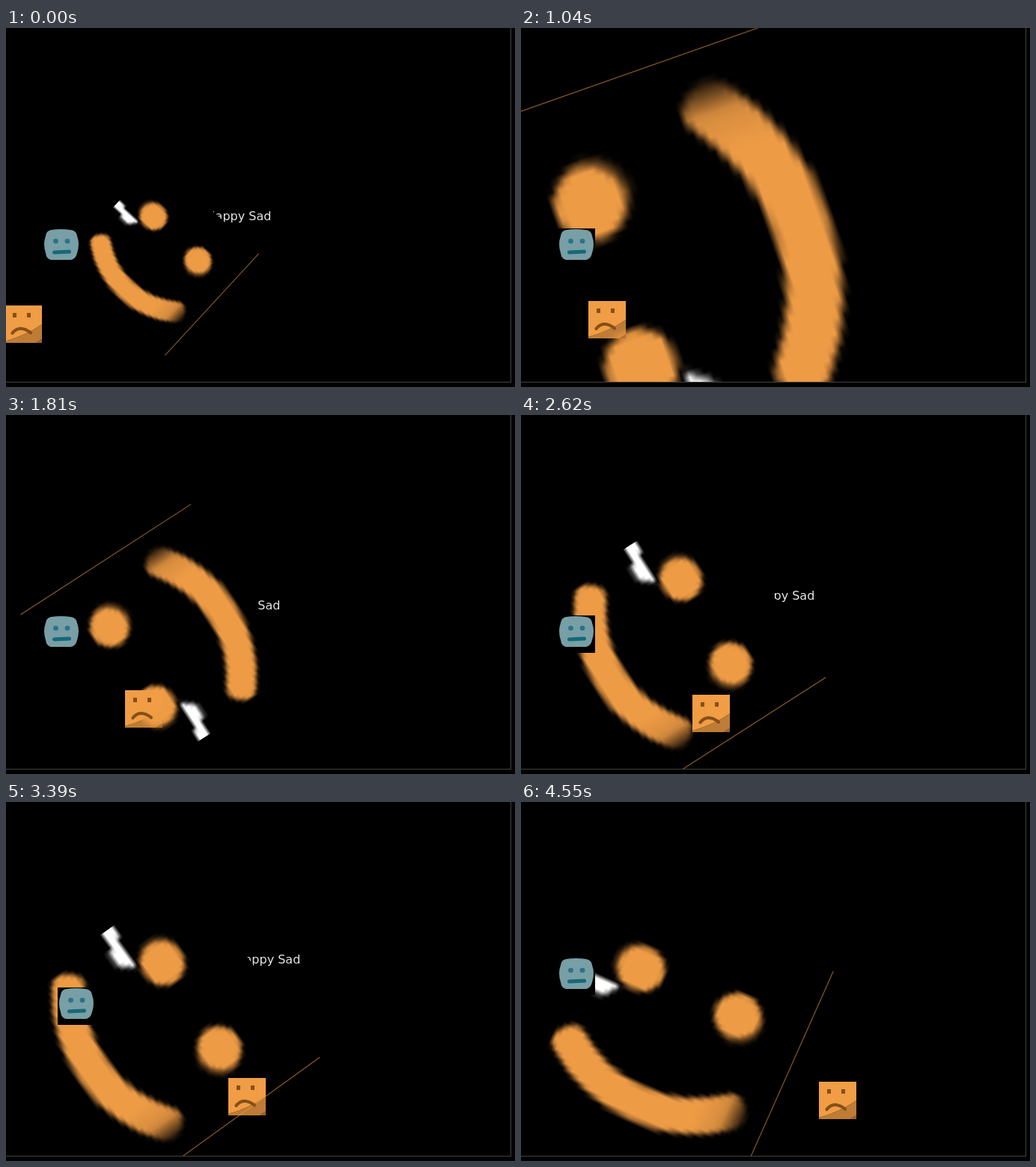
Write an HTML page with a canvas that moves like this. It is 680 px wide and 480 px high and loops after 4590 ms.

```html
<!DOCTYPE html>
<html lang="en">
<head>
<meta charset="utf-8">
<title>Happy Sad</title>
<style>
html, body { margin: 0; width: 100%; height: 100%; overflow: hidden; background: #000; }
canvas { display: block; width: 680px; height: 480px; }
</style>
</head>
<body>
<canvas id="stage" width="680" height="480"></canvas>
<script>
const LOOP = 4590;
const ORANGE = '#ed9b45';
const ctx = document.getElementById('stage').getContext('2d');

// Tracks: [time, x, y]
const pointer = [ // direction turns the happy face, distance scales it
  [0, 2.72, 2.5], [110, 3.08, 3.08], [390, -2.36, -2.36], [640, -1.1, -1.1],
  [1100, -3.7, -10.8], [1340, -4.32, -13.5], [1460, -4.4, -13.8], [1630, -4.5, -11],
  [1810, -2.97, -4.58], [2160, 3.3, 5.1], [2620, 3.13, 4.88], [3000, 3.4, 5.26],
  [3390, 3.55, 4.94], [3620, 6.1, 3], [3830, 4.54, 4.54], [4550, 5.82, 2.59]
];
const label = [
  [0, 267.5, 257], [640, 310.5, 230], [1340, 295, 246], [1810, 279.5, 260],
  [2620, 305.5, 247], [3390, 306.5, 216], [4550, 298, 252]
];
const sad = [
  [0, -2, 371], [640, 55, 365], [1340, 116, 365], [1810, 159, 368],
  [2620, 229, 374], [3390, 297, 369], [4550, 398, 374]
];
const neutral = [
  [0, 49, 268], [3000, 69, 268], [3250, 69, 248],
  [3700, 69, 228], [3950, 49, 228], [4200, 49, 208]
];

function lerpTrack(track, t) {
  const i = track.findIndex(k => k[0] > t);
  if (i < 0) return track[track.length - 1].slice(1);
  const [a, b] = [track[i - 1], track[i]];
  const p = (t - a[0]) / (b[0] - a[0]);
  return [a[1] + (b[1] - a[1]) * p, a[2] + (b[2] - a[2]) * p];
}

function holdTrack(track, t) {
  return track.filter(k => k[0] <= t).pop().slice(1);
}

function ellipse(g, x, y, rx, ry, fill) {
  g.fillStyle = fill;
  g.beginPath();
  g.ellipse(x, y, rx, ry, 0, 0, Math.PI * 2);
  g.fill();
}

function shape(g, d, fill) {
  g.fillStyle = fill;
  g.fill(new Path2D(d));
}

function line(g, d, color, width) {
  g.strokeStyle = color;
  g.lineWidth = width;
  g.lineCap = 'round';
  g.stroke(new Path2D(d));
}

// Small bitmap, so that enlarging it gives soft edges
function makeHappy() {
  const c = document.createElement('canvas');
  c.width = c.height = 50;
  const g = c.getContext('2d');
  g.fillStyle = '#000';
  g.fillRect(0, 0, 50, 50);
  g.translate(25, 25);
  const halo = 'rgba(237,155,69,.3)';
  ellipse(g, -12.8, -9.3, 5.3, 4.7, halo);
  ellipse(g, 11.1, -7.5, 5.2, 4.9, halo);
  ellipse(g, -12, -9.1, 5, 4.7, ORANGE);
  ellipse(g, 10.5, -8.2, 5, 4.7, ORANGE);
  const fade = g.createLinearGradient(11, 0, 20.5, 0);
  fade.addColorStop(0, ORANGE);
  fade.addColorStop(0.55, '#d58b3e');
  fade.addColorStop(1, '#2a1b0c');
  line(g, 'M-19.2 11.2C-10 18.5 6 19.5 17 11', fade, 7.4);
  shape(g, 'M-25-1.9V-5H-22.2V-4L-14.6-3.9-17-.8H-20.8V-1.9Z', '#fff');
  return c;
}
const happy = makeHappy();

function drawHappy(t) {
  const [mx, my] = lerpTrack(pointer, t);
  const s = Math.hypot(mx, my);
  if (s < 0.01) return;
  const half = 25 * s;
  ctx.save();
  ctx.translate(207, 307);
  ctx.rotate(Math.atan2(my, mx));
  ctx.drawImage(happy, -half, -half, 2 * half, 2 * half);
  ctx.globalAlpha = Math.min(1, 0.2 + s / 5) * 0.62;
  ctx.lineCap = 'butt';
  ctx.strokeStyle = ORANGE;
  ctx.lineWidth = 1.1;
  ctx.beginPath();
  ctx.moveTo(half, -half);
  ctx.lineTo(half, half);
  ctx.stroke();
  ctx.restore();
}

function drawNeutral(t) {
  const [x, y] = holdTrack(neutral, t);
  ctx.save();
  ctx.translate(x, y);
  ctx.fillStyle = '#000';
  ctx.fillRect(0, 0, 50, 50);
  shape(ctx, 'M11 2Q24 0 38 2Q45 3 46 10Q50 21 46 33Q44 41 38 42H11Q5 41 4 33Q0 21 4 10Q5 3 11 2Z', '#779fa5');
  ellipse(ctx, 17.5, 17, 3.4, 3.2, '#2a7388');
  ellipse(ctx, 33, 17, 3.4, 3.2, '#2a7388');
  line(ctx, 'M15.5 32Q25 31.5 35.5 31', '#176878', 5);
  ctx.restore();
}

function drawSad(t) {
  const [x, y] = lerpTrack(sad, t).map(Math.round);
  const brown = '#855019';
  ctx.save();
  ctx.translate(x, y);
  shape(ctx, 'M0 0H50V25Q37 34 25 39Q12 45 0 48Z', '#f09d45');
  shape(ctx, 'M50 25Q37 34 25 39Q12 45 0 48V50H50Z', 'rgba(238,156,68,.8)');
  shape(ctx, 'M50 44V50H41Z', 'rgba(90,50,15,.35)');
  ctx.fillStyle = brown;
  ctx.fillRect(11, 10, 5, 6);
  ctx.fillRect(30, 10, 5, 6);
  line(ctx, 'M10.5 37Q20 25 35 36.5', brown, 4.2);
  ctx.restore();
}

function draw(t) {
  ctx.fillStyle = '#000';
  ctx.fillRect(0, 0, 680, 480);
  ctx.save();
  ctx.beginPath();
  ctx.rect(0, 0, 674, 473);
  ctx.clip();
  const [x, y] = lerpTrack(label, t);
  ctx.font = '16px "DejaVu Sans", sans-serif';
  ctx.fillStyle = '#e6e6e6';
  ctx.fillText('Happy Sad', x, y);
  drawHappy(t);
  drawNeutral(t);
  drawSad(t);
  ctx.restore();
  ctx.fillStyle = '#424242';
  ctx.fillRect(674, 0, 1, 474);
  ctx.fillRect(0, 473, 674, 1);
}

const start = performance.now();
function tick() {
  draw((performance.now() - start) % LOOP);
  requestAnimationFrame(tick);
}
tick();
</script>
</body>
</html>
```
